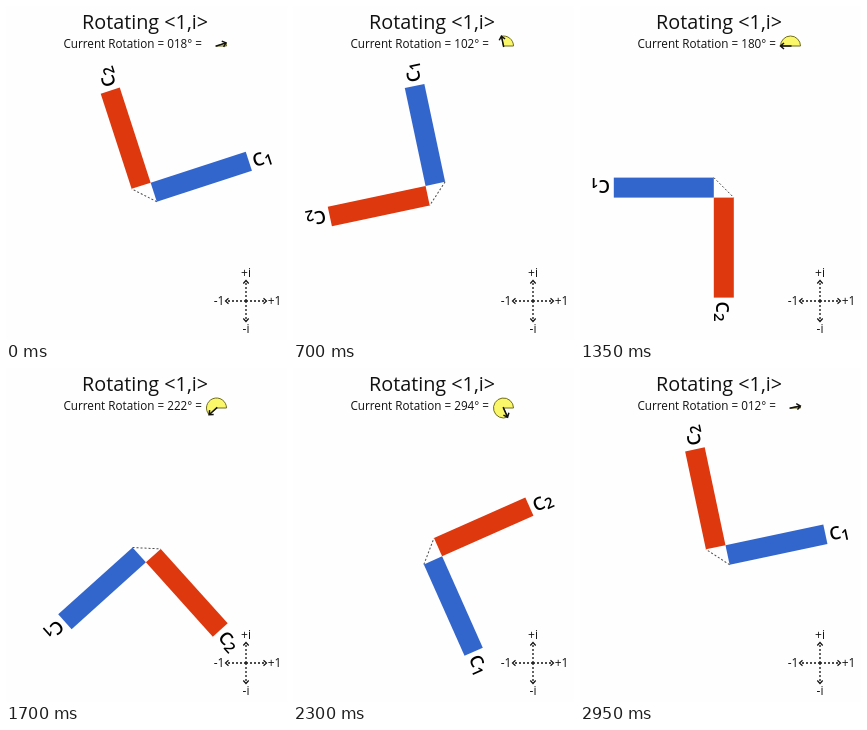
Write an HTML page that moves like this. It is 281 by 334 pixels and loops after 3000 ms.

```html
<!DOCTYPE html>
<html lang="en">
<head>
<meta charset="utf-8">
<title>Rotating vector</title>
<style>
  html, body { margin: 0; width: 100%; height: 100%; overflow: hidden; background: #fefefe; }
  svg { display: block; width: 281px; height: 334px; }
  text { font-family: "Open Sans", "Noto Sans", sans-serif; fill: #111; }
  .title { font-size: 19.8px; }
  .info { font-size: 11.7px; white-space: pre; }
  .axis text { font-size: 12px; text-anchor: middle; }
  .label { font-size: 18px; font-weight: 600; fill: #000; }
  .label tspan { font-size: 15px; }
  .line { fill: none; stroke: #111; }
</style>
</head>
<body>
<svg viewBox="0 0 281 334">
  <defs>
    <g id="arm" class="line">
      <path d="M0 0H19" stroke-width="1.3" stroke-dasharray="2 2"/>
      <path d="M17.5 -2.7L20.5 0L17.5 2.7" stroke-width="1.2"/>
    </g>
  </defs>

  <text class="title" x="76" y="23">Rotating &lt;1,i&gt;</text>
  <text class="info" id="info" x="57.5" y="42"></text>

  <g transform="translate(210.5 40)">
    <path id="pie" fill="#fbf76a" stroke="#6f6d1c" stroke-width="1"/>
    <g id="hand" class="line" stroke-width="1.5">
      <path d="M-1 0H10M6.5 -3L10 0L6.5 3"/>
    </g>
  </g>

  <g class="axis">
    <g id="arms" transform="translate(240 295)"></g>
    <text x="240" y="271">+i</text>
    <text x="240" y="327">-i</text>
    <text x="213" y="299">-1</text>
    <text x="268.5" y="299">+1</text>
  </g>

  <g id="pair">
    <path class="line" d="M6.6 13.4L-13.4 -6.6" stroke-width="1" stroke-dasharray="2 2" opacity=".75"/>
    <rect x="6.6" y="-6.6" width="100" height="20" fill="#3366cc"/>
    <rect x="-13.4" y="-106.6" width="20" height="100" fill="#de380f"/>
    <text class="label" x="110.5" y="10.8">C<tspan dy="2.5">1</tspan></text>
    <text class="label" x="110.5" y="4.2" transform="rotate(-90)">C<tspan dy="2.5">2</tspan></text>
  </g>
</svg>
<script>
  const STEP_MS = 50, STEPS = 60, STEP_DEG = 6, START_DEG = 18, RADIUS = 10;
  const el = id => document.getElementById(id);

  el("arms").innerHTML = [0, 90, 180, 270]
    .map(a => `<use href="#arm" transform="rotate(${a})"/>`).join("");

  // Sector from the positive x axis, counterclockwise.
  function sector(deg) {
    if (!deg) return "";
    const a = deg * Math.PI / 180;
    const x = RADIUS * Math.cos(a), y = -RADIUS * Math.sin(a);
    return `M0 0H${RADIUS}A${RADIUS} ${RADIUS} 0 ${deg > 180 ? 1 : 0} 0 ${x} ${y}Z`;
  }

  function draw(ms) {
    const step = Math.floor(ms / STEP_MS) % STEPS;
    const deg = (START_DEG + step * STEP_DEG) % 360;
    el("info").textContent = `Current Rotation = ${String(deg).padStart(3, "0")}° =`;
    el("pair").setAttribute("transform", `translate(140.4 185) rotate(${-deg})`);
    el("hand").setAttribute("transform", `rotate(${-deg})`);
    el("pie").setAttribute("d", sector(deg));
  }

  const start = performance.now();
  function tick() {
    draw(performance.now() - start);
    requestAnimationFrame(tick);
  }
  tick();
</script>
</body>
</html>
```
